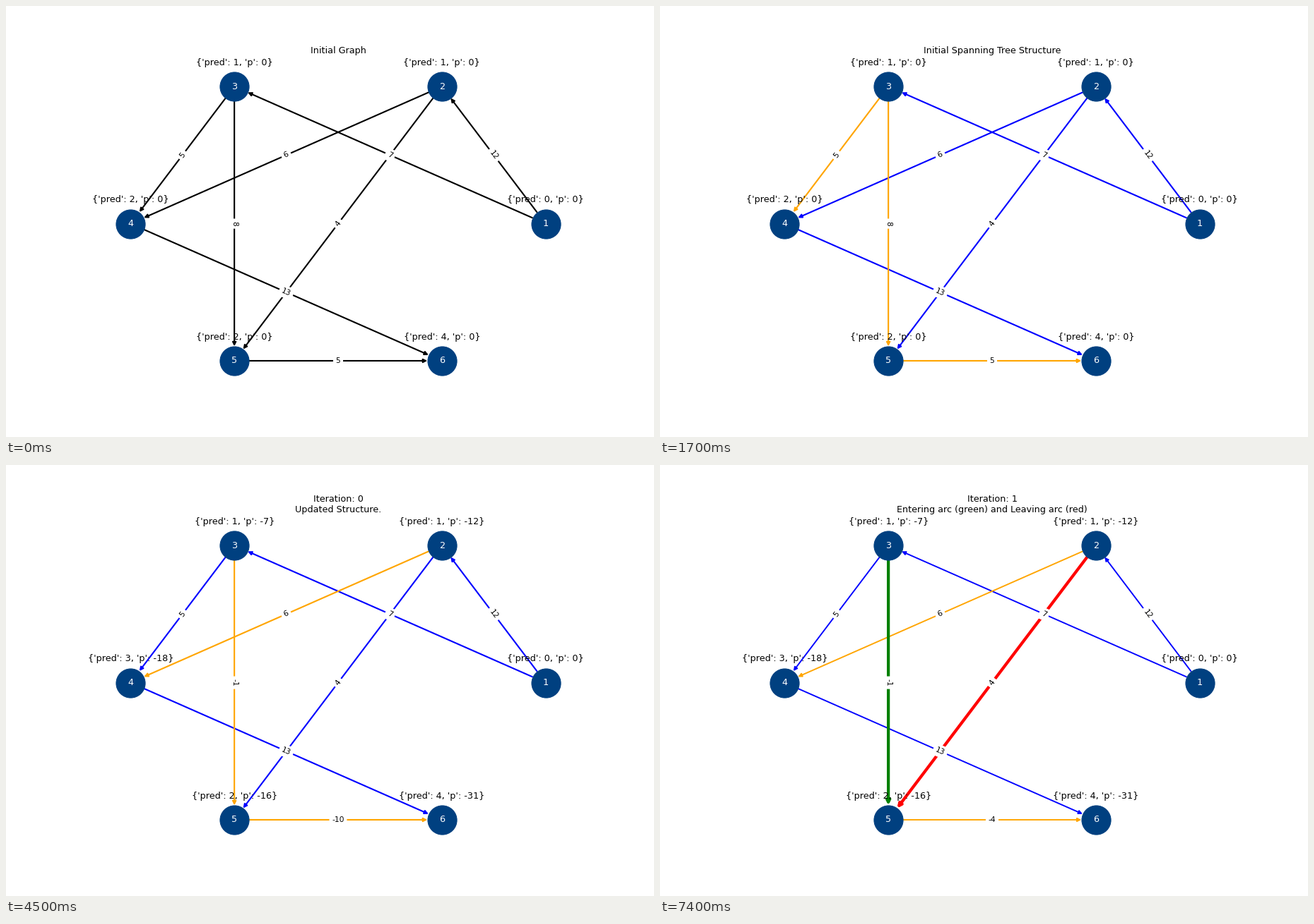
A matplotlib script that plays this animation: 917 px wide and 611 px high, repeating every 8 s.

```python
import math

import matplotlib.pyplot as plt
from matplotlib.animation import FuncAnimation
from matplotlib.patches import FancyArrowPatch

W, H = 917, 611
DPI = W / 12
CENTER = (0.5125 * W, 0.505 * H)
RADIUS_X = 0.775 * W / 1.21 / 2
RADIUS_Y = 0.77 * H / 1.21 / 2
UNIT_Y = RADIUS_Y / math.sin(math.pi / 3)

plt.rcParams["font.family"] = "DejaVu Sans"

COSTS = {(1, 2): 12, (1, 3): 7, (2, 4): 6, (2, 5): 4,
         (3, 4): 5, (3, 5): 8, (4, 6): 13, (5, 6): 5}
NODES = (1, 2, 3, 4, 5, 6)
# Counter-clockwise order on the ring, starting at the right.
RING = (1, 2, 3, 4, 5, 6)
START = {"preds": (0, 1, 1, 2, 2, 4), "potentials": (0,) * 6}
UPDATED = {"preds": (0, 1, 1, 3, 2, 4),
           "potentials": (0, -12, -7, -18, -16, -31)}
FIRST_TREE = {(1, 2), (1, 3), (2, 4), (2, 5), (4, 6)}
SECOND_TREE = FIRST_TREE - {(2, 4)} | {(3, 4)}
ARC_TITLE = "Entering arc (green) and Leaving arc (red)"

# Each stage starts at the given tick of half a second.
STAGES = [
    dict(start=0, title="Initial Graph", tree=None, **START),
    dict(start=1, title="Initial Spanning Tree Structure",
         tree=FIRST_TREE, **START),
    dict(start=5, title=f"Iteration: 0\n{ARC_TITLE}", tree=FIRST_TREE,
         entering=(3, 4), leaving=(2, 4),
         reduced={(3, 4): -6, (3, 5): -1, (5, 6): -10}, **START),
    dict(start=9, title="Iteration: 0\nUpdated Structure.",
         tree=SECOND_TREE, reduced={(3, 5): -1, (5, 6): -10}, **UPDATED),
    dict(start=13, title=f"Iteration: 1\n{ARC_TITLE}", tree=SECOND_TREE,
         entering=(3, 5), leaving=(2, 5),
         reduced={(3, 5): -1, (5, 6): -4}, **UPDATED),
]


def ring_position(index):
    angle = index * math.pi / 3
    return (CENTER[0] + RADIUS_X * math.cos(angle),
            CENTER[1] - UNIT_Y * math.sin(angle))


POS = {node: ring_position(i) for i, node in enumerate(RING)}

fig = plt.figure(figsize=((W + 0.01) / DPI, (H + 0.01) / DPI), dpi=DPI,
                 facecolor="white")
ax = fig.add_axes([0, 0, 1, 1])
ax.set_xlim(0, W)
ax.set_ylim(H, 0)
ax.axis("off")


def add_text(x, y, text="", size=12, **style):
    style = {"ha": "center", "va": "center", "zorder": 3, **style}
    return ax.text(x, y, text, fontsize=size, **style)


def add_arrow(edge):
    arrow = FancyArrowPatch(POS[edge[0]], POS[edge[1]], arrowstyle="-|>",
                            mutation_scale=10, linewidth=2,
                            shrinkA=math.sqrt(1500) / 2,
                            shrinkB=math.sqrt(1500) / 2)
    return ax.add_patch(arrow)


def add_edge_label(edge):
    (x0, y0), (x1, y1) = POS[edge[0]], POS[edge[1]]
    angle = math.degrees(math.atan2(y0 - y1, x1 - x0))
    if angle > 90.001:
        angle -= 180
    elif angle < -90.001:
        angle += 180
    return add_text((x0 + x1) / 2, (y0 + y1) / 2, size=10, rotation=angle,
                    rotation_mode="default", zorder=1.5,
                    bbox=dict(boxstyle="round", ec="white", fc="white"))


arrows = {edge: add_arrow(edge) for edge in COSTS}
edge_labels = {edge: add_edge_label(edge) for edge in COSTS}
ax.scatter(*zip(*POS.values()), s=1500, c="#004080", linewidths=1, zorder=2)
for node, (x, y) in POS.items():
    add_text(x, y, str(node), color="white")
node_labels = [add_text(POS[n][0], POS[n][1] - 0.15 * UNIT_Y) for n in NODES]
title = add_text(CENTER[0], 0.12 * H - 6 * DPI / 72, va="baseline")


def edge_style(stage, edge):
    """Colour, line width and stacking order of one edge."""
    if stage["tree"] is None:
        return "black", 2, 1
    if edge == stage.get("entering"):
        return "green", 4, 1.2
    if edge == stage.get("leaving"):
        return "red", 4, 1.2
    width = 1.8 if "entering" in stage else 2
    if edge in stage["tree"]:
        return "blue", width, 1
    return "orange", width, 1.1


def update(tick):
    stage = [s for s in STAGES if s["start"] <= tick][-1]
    title.set_text(stage["title"])
    values = {**COSTS, **stage.get("reduced", {})}
    for edge, arrow in arrows.items():
        color, width, order = edge_style(stage, edge)
        arrow.set_color(color)
        arrow.set_linewidth(width)
        arrow.set_zorder(order)
        edge_labels[edge].set_text(str(values[edge]))
    for label, pred, p in zip(node_labels, stage["preds"],
                              stage["potentials"]):
        label.set_text(str({"pred": pred, "p": p}))
    return [title, *arrows.values(), *edge_labels.values(), *node_labels]


animation = FuncAnimation(fig, update, frames=16, interval=500, repeat=True,
                          repeat_delay=0, blit=False)
plt.show()
```
